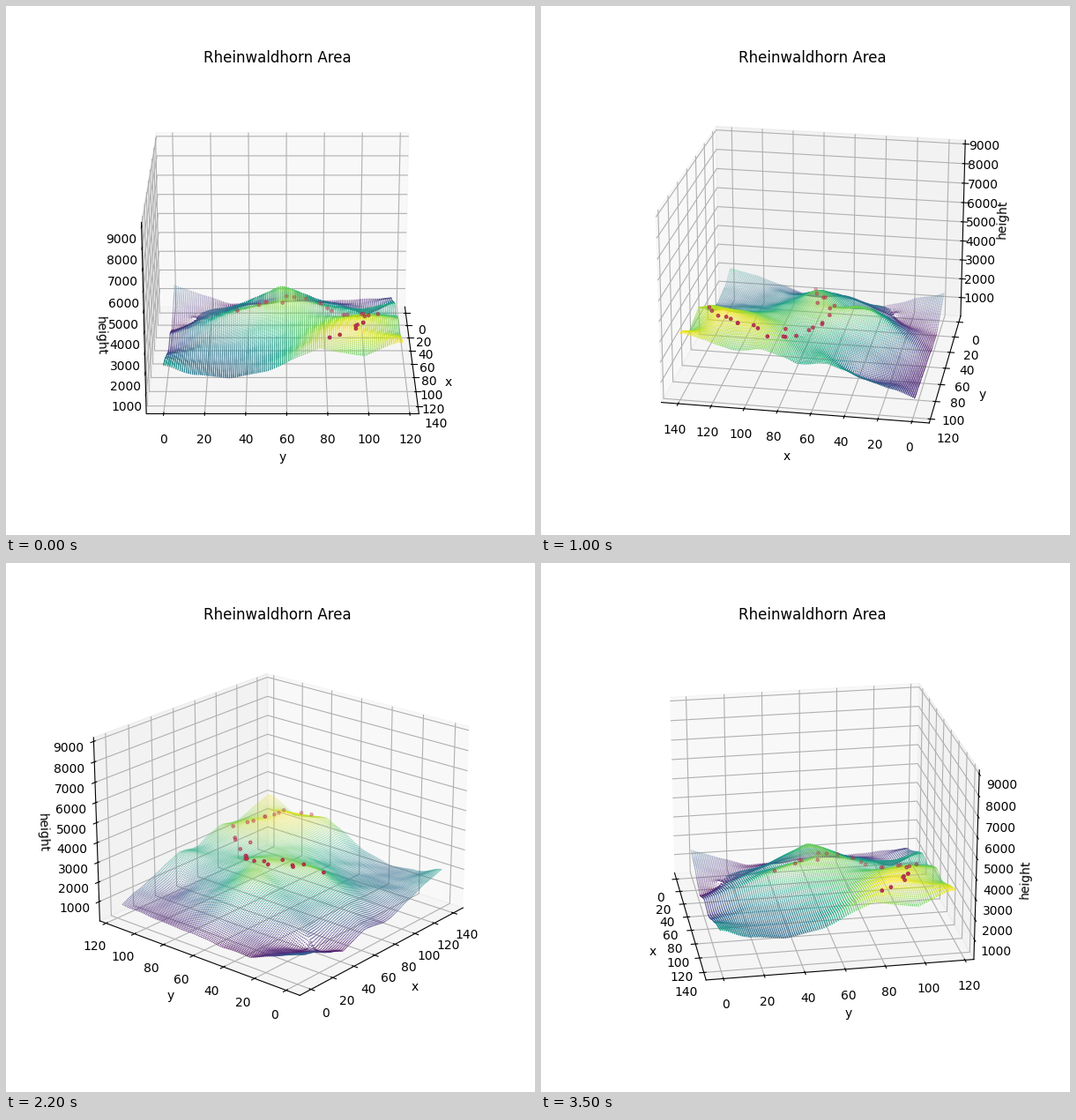
These frames come from a looping animation (600 px wide and 600 px high, 3600 ms). A matplotlib script:

```python
import matplotlib.pyplot as plt
import numpy as np
from matplotlib.animation import FuncAnimation

FRAMES, INTERVAL = 36, 100
NX, NY = 141, 117
N_SPOTS = 26

# Key points (x, y, height) of the lines that shape the terrain.
RIM = [(0, 0, 1490), (0, 30, 530), (0, 64, 570), (0, 116, 830),
       (52, 116, 2200), (70, 116, 2050), (92, 116, 2750), (108, 116, 2450),
       (140, 116, 3250), (140, 98, 2480), (140, 76, 2930), (140, 50, 1700),
       (140, 32, 1400), (140, 14, 1520), (140, 0, 2100), (84, 0, 850),
       (62, 0, 980), (42, 0, 480), (0, 0, 1490)]
CREST = [(76, 38, 2600), (62, 60, 2750), (58, 70, 2650), (74, 86, 2200),
         (90, 103, 2900), (122, 94, 3250), (130, 82, 3050)]
RIDGES = [
    [(62, 0, 980), (70, 14, 1700), (76, 38, 2600)],
    [(62, 60, 2750), (36, 57, 2600), (8, 60, 1000)],
    [(58, 70, 2650), (40, 80, 1800), (26, 95, 1150)],
    [(62, 60, 2750), (50, 42, 2050), (30, 12, 1050)],
    [(52, 116, 2200), (74, 86, 2200)],
    [(130, 82, 3050), (140, 76, 2930)],
]
VALLEYS = [
    [(0, 30, 530), (20, 24, 600), (42, 0, 480)],
    [(0, 90, 720), (20, 104, 900), (38, 103, 1200)],
    [(140, 32, 1400), (112, 35, 1550), (100, 55, 2050)],
]


def along(line, n):
    """Pick n evenly spaced points on a polyline."""
    pts = np.array(line, float)
    run = np.hypot(*np.diff(pts[:, :2], axis=0).T)
    dist = np.concatenate(([0], np.cumsum(run)))
    n = n or int(dist[-1] / 4) + 2
    s = np.linspace(0, dist[-1], n)
    return np.column_stack([np.interp(s, dist, col) for col in pts.T])


def distance(a, b):
    return np.hypot(a[:, None, 0] - b[None, :, 0],
                    a[:, None, 1] - b[None, :, 1])


def fit_surface(lines, grid):
    """Interpolate with a cone kernel, which keeps the creases sharp."""
    pts = np.vstack([along(line, None) for line in lines])
    mean = pts[:, 2].mean()
    kernel = 0.3 * np.eye(len(pts)) - distance(pts, pts)
    weights = np.linalg.solve(kernel, pts[:, 2] - mean)
    return mean - distance(grid, pts) @ weights


rng = np.random.default_rng(7)
xs, ys = np.meshgrid(np.arange(NX), np.arange(NY), indexing="ij")
grid = np.column_stack([xs.ravel(), ys.ravel()])
height = fit_surface([RIM, CREST, *RIDGES, *VALLEYS], grid)

# Rough ground: waves of random direction and length.
for _ in range(14):
    angle, phase = rng.uniform(0, 2 * np.pi, 2)
    length = rng.uniform(9, 36)
    wave = grid @ (np.cos(angle), np.sin(angle))
    height += 0.5 * length * np.sin(2 * np.pi * wave / length + phase)
height = np.maximum(height, 450).reshape(NX, NY)

# Spots gather along the crest.
spots = along(CREST, N_SPOTS)[:, :2] + rng.normal(0, 2.5, (N_SPOTS, 2))
sx, sy = spots.round().astype(int).T

fig = plt.figure(figsize=(6, 6), dpi=100)
ax = fig.add_subplot(projection="3d", computed_zorder=False)
ax.scatter(xs.ravel(), ys.ravel(), height.ravel(), c=height.ravel(),
           cmap="viridis", s=1, linewidths=0)
ax.scatter(sx, sy, height[sx, sy] + 90, s=6, linewidths=0.9,
           color="#c93444", edgecolors="#a52a4e", zorder=2)

ax.set(xlim=(-10.2, 150.2), ylim=(-8.46, 124.46), zlim=(10, 9190),
       xlabel="x", ylabel="y", zlabel="height", title="Rheinwaldhorn Area")


def update(i):
    ax.view_init(elev=22, azim=i * 360 / FRAMES)
    return []


anim = FuncAnimation(fig, update, frames=FRAMES, interval=INTERVAL,
                     repeat=True, repeat_delay=0)
plt.show()
```
